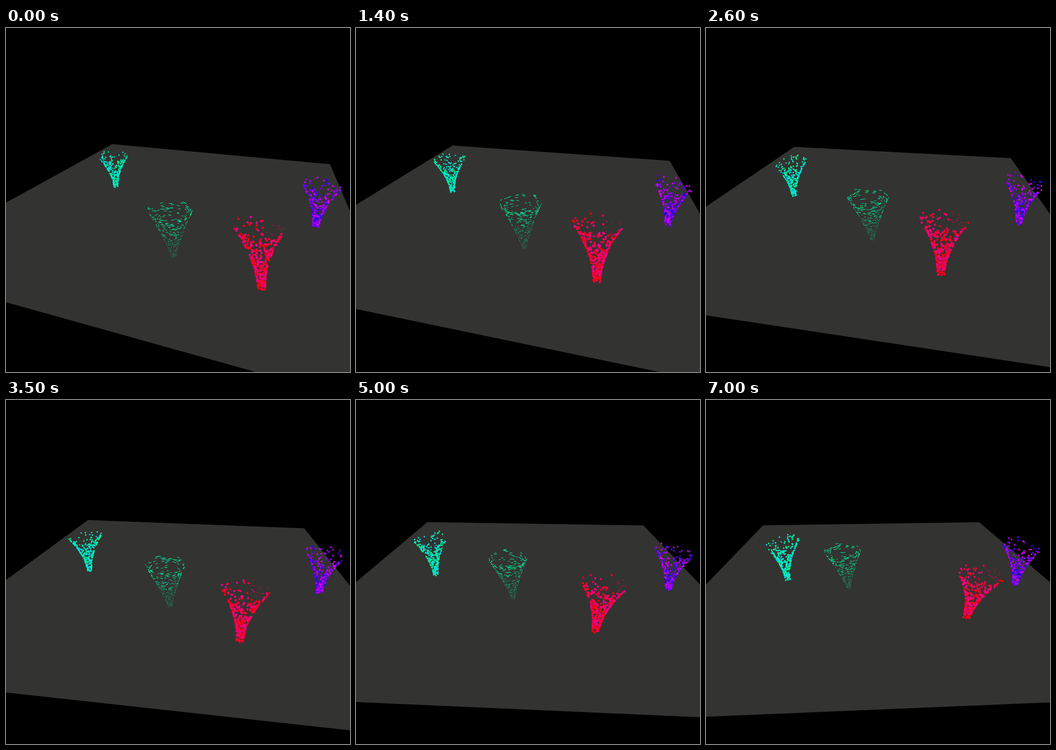
Write an HTML page with a canvas that moves like this. It is 748x748 px and loops after 7.1 s.

```html
<!DOCTYPE html>
<html>
<head>
<meta charset="utf-8">
<style>
html, body { margin: 0; height: 100%; overflow: hidden; background: #000; }
canvas { display: block; }
</style>
</head>
<body>
<canvas id="stage" width="748" height="748"></canvas>
<script>
const ctx = document.getElementById('stage').getContext('2d');
const TAU = Math.PI * 2, MID = 374;
const STEP = 100, STEPS = 71;
const FOCAL = 647.8, DISTANCE = 1.865, SIN = 0.4472, COS = 0.8944;

let seed = 11;
function random() {
  seed = (seed + 0x6D2B79F5) | 0;
  let r = Math.imul(seed ^ (seed >>> 15), seed | 1);
  r ^= r + Math.imul(r ^ (r >>> 7), r | 61);
  return ((r ^ (r >>> 14)) >>> 0) / 4294967296;
}
const mix = (a, b, p) => a + (b - a) * p;

// Parabola through start, middle and end.
const arc = ([a, b, c], p) => mix(a, c, p) + (2 * b - a - c) * 2 * p * (1 - p);

// x, y: path of the foot. lean, rise: rim relative to the foot. width: rim radius.
const funnels = [
  { x: [239, 182, 178], y: [345, 371, 391], lean: [-5, -14], rise: [-68, -83], width: [33, 38],
    hue: [148, 194], count: 290, foot: 0.13, flare: 1.8 },
  { x: [365, 357, 311], y: [499, 450, 410], lean: [-8, -14], rise: [-104, -83], width: [49, 40],
    hue: [146, 170], count: 380, foot: 0.1, flare: 1.25, dashes: true },
  { x: [673, 680, 672], y: [434, 421, 401], lean: [13, 13], rise: [-95, -84], width: [44, 42],
    hue: [246, 298], count: 260, foot: 0.14, flare: 1.8 },
  { x: [556, 508, 566], y: [567, 524, 473], lean: [-7, 32], rise: [-133, -93], width: [56, 50],
    hue: [322, 362], count: 330, foot: 0.14, flare: 1.9, flatSide: true }
];

for (const f of funnels) {
  f.dots = Array.from({ length: f.count }, () => ({
    height: random(),
    angle: random() * TAU,
    color: `hsl(${mix(...f.hue, random())}, 100%, 47%)`
  }));
}

function drawFloor(n) {
  const turn = 0.005 * (60.3 - n), c = Math.cos(turn), s = Math.sin(turn);
  ctx.fillStyle = '#333331';
  ctx.beginPath();
  for (const [x, z] of [[-1, 1], [1, 1], [1, -1], [-1, -1]]) {
    const side = x * c + z * s, far = z * c - x * s;
    const scale = FOCAL / (DISTANCE + far * COS);
    ctx.lineTo(MID + side * scale, MID - far * SIN * scale);
  }
  ctx.fill();
}

function drawFunnel(f, n) {
  const p = n / (STEPS - 1);
  const footX = arc(f.x, p), footY = arc(f.y, p);
  const lean = mix(...f.lean, p), rise = mix(...f.rise, p), width = mix(...f.width, p);
  const tilt = (footX + lean - MID) * 0.0007;

  for (const { height, angle, color } of f.dots) {
    const a = angle + n * 0.15, c = Math.cos(a), s = Math.sin(a);
    const radius = width * mix(f.foot, 1, height ** f.flare);
    const x = footX + lean * height + radius * c;
    const y = footY + rise * height + radius * (0.42 * s + tilt * c);
    ctx.beginPath();
    if (f.dashes) {
      const half = 0.5 + width * 0.07 * height ** 1.6;
      const dx = -s * half, dy = (0.42 * c - tilt * s) * half;
      ctx.strokeStyle = color;
      ctx.lineWidth = 0.5 + 0.6 * height;
      ctx.moveTo(x - dx, y - dy);
      ctx.lineTo(x + dx, y + dy);
      ctx.stroke();
    } else {
      const size = width * 0.045;
      const flat = f.flatSide && height > 0.75 && Math.cos(a + 0.7) > 0.85;
      ctx.fillStyle = color;
      ctx.ellipse(x, y, size, flat ? 0.5 : size, 0.4, 0, TAU);
      ctx.fill();
    }
  }
}

function draw() {
  const n = Math.floor(performance.now() / STEP) % STEPS;
  ctx.clearRect(0, 0, 748, 748);
  drawFloor(n);
  for (const f of funnels) drawFunnel(f, n);
  requestAnimationFrame(draw);
}
draw();
</script>
</body>
</html>
```
